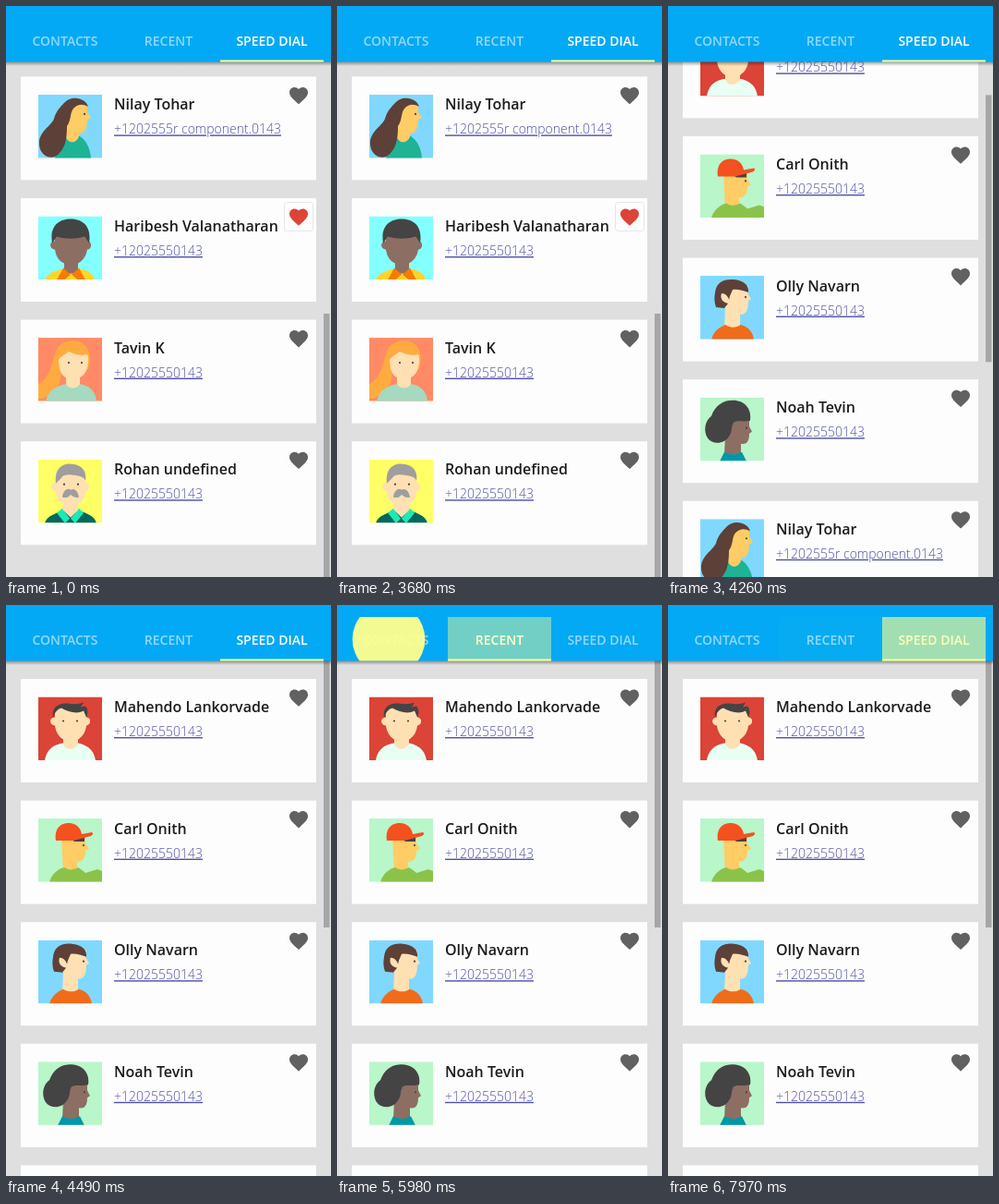
Recreate the animation shown at these times as an HTML page. Size 352x618 px, loop 8 s.

```html
<!DOCTYPE html>
<html lang="en">
<head>
<meta charset="utf-8">
<title>Speed dial</title>
<style>
  html, body { margin: 0; width: 100%; height: 100%; overflow: hidden; background: #dfdfdf; }
  svg { display: block; font-family: "Open Sans", "Noto Sans", sans-serif; }
  .name { font-size: 16px; font-weight: 600; fill: #1c1c1c; }
  .phone { font-size: 14px; font-weight: 300; fill: #5050a8; }
  .tab { font-size: 14px; font-weight: 600; fill: #fff; text-anchor: middle; }
</style>
</head>
<body>
<svg width="352" height="618" viewBox="0 0 352 618">
  <defs>
    <clipPath id="face"><rect width="69" height="68.5"/></clipPath>
    <linearGradient id="shade" x2="0" y2="1">
      <stop stop-color="#000" stop-opacity=".4"/>
      <stop offset="1" stop-color="#000" stop-opacity="0"/>
    </linearGradient>
  </defs>
  <rect width="352" height="618" fill="#dfdfdf"/>
  <g id="list"></g>
  <rect id="thumb" x="344" width="6.5" height="289" fill="#a6a6a8"/>
  <rect y="60" width="352" height="5" fill="url(#shade)"/>
  <rect width="352" height="60.5" fill="#03a9f4"/>
  <g id="tabs"></g>
  <rect id="bar" y="58.5" height="2" fill="#ffff8d"/>
  <g id="ripples" fill="#ffff8d"></g>
</svg>
<script>
const $ = id => document.getElementById(id);
const path = (fill, d) => `<path fill="${fill}" d="${d}"/>`;
const dots = (...xy) => xy.map(([x, y]) => `<circle cx="${x}" cy="${y}" r="1.1" fill="#444"/>`).join('');
const HEART = 'M12 21.35l-1.45-1.32C5.4 15.36 2 12.28 2 8.5 2 5.42 4.42 3 7.5 3c1.74 0 3.41.81 4.5 2.09C13.09 3.81 14.76 3 16.5 3 19.58 3 22 5.42 22 8.5c0 3.78-3.4 6.86-8.55 11.54z';
const PHONE = '+12025550143';
const DARK = '#444', BROWN = '#5d4037', PALE = '#ffe0b2', TAN = '#ffcc66', UMBER = '#8d6e63';
const SKY = '#80d8ff', MINT = '#b9f6ca';

// name, backdrop, portrait shapes, phone
const people = [
  ['Mahendo Lankorvade', '#db4437',
    path('#e8fff4', 'M7 69C9 55 19 51 27 50H43C52 52 60 56 62 69Z') +
    path(PALE, 'M18 16C22 7 47 7 52 16V22C58 22 57 31 52 31C51 40 46 44 43 46V51C39 58 30 58 27 51V46C22 43 19 38 18 31C12 31 11 22 18 22Z') +
    path(DARK, 'M16 22C14 11 22 6 32 7C38 8 44 8 49 6L46 11L51 10C54 13 54 18 52 22L49 15C42 19 32 16 25 12C19 14 18 18 16 22Z') +
    dots([27, 26], [42, 26])],
  ['Carl Onith', MINT,
    path(TAN, 'M25 20H51V27L55 33L51 35C51 44 47 47 42 47V56L27 58Z') +
    path('#8bc34a', 'M12 69C15 58 24 54 28 53C34 57 40 55 43 53C46 55 49 57 51 59L64 55L69 57V69Z') +
    path(DARK, 'M36 23L50 20V25L39 25Z') +
    path('#f4511e', 'M19 24C17 10 25 5 33 5C41 5 46 10 47 17L58 15C60 16 59 18 57 19L38 24Z') +
    dots([49, 29])],
  ['Olly Navarn', SKY,
    path(PALE, 'M28 11H52V20L55 25L52 27C52 38 49 42 43 42V56L26 58Z') +
    path('#ef6c1a', 'M12 69C15 58 23 55 27 53C33 57 39 56 44 53C52 55 57 61 58 69Z') +
    path(BROWN, 'M17 34C15 29 15 23 16 18C17 7 26 3 36 4C47 5 53 10 52 18C46 16 40 14 35 15L32 22L30 30L26 35Z') +
    path(PALE, 'M32 30C24 30 21 24 23 19C28 19 31 23 32 30Z') +
    dots([49, 23])],
  ['Noah Tevin', MINT,
    path(UMBER, 'M28 20H53V31L56 37L53 39C53 49 49 51 44 50V62H26Z') +
    path('#0097a7', 'M21 69L26 59C33 63 40 62 45 59L50 69Z') +
    path(DARK, 'M35 3C48 3 56 12 54 25C46 27 41 24 36 27C33 32 35 37 31 42C26 51 13 51 8 44C3 36 5 25 12 20C16 9 24 3 35 3Z') +
    dots([50, 33])],
  ['Nilay Tohar', SKY,
    path('#1db394', 'M18 69C20 52 28 43 36 42C48 43 56 54 57 69Z') +
    path(TAN, 'M31 11H53V19L57 25L53 27C53 38 49 42 44 42C46 49 34 58 29 44Z') +
    path(BROWN, 'M27 10C35 0 51 3 54 13C48 10 43 10 38 15C34 20 36 27 31 34C31 45 30 56 23 63C17 72 2 68 1 54C0 40 14 34 17 26C19 19 22 15 27 10Z') +
    dots([50, 21])],
  ['Haribesh Valanatharan', '#84ffff',
    path('#ffd42a', 'M7 69C9 62 19 59 26 57H46C53 59 60 62 61 69Z') +
    path(UMBER, 'M18 18H53V27C59 27 58 36 53 36C52 44 47 49 43 51V62H28V51C23 49 19 44 18 36C12 36 11 27 18 27Z') +
    path('#f57c00', 'M27 56L35 63L28 69H20ZM44 56L36 63L43 69H51Z') +
    path(DARK, 'M15 29C12 11 22 3 35 3C48 3 58 11 55 29C52 26 52 23 50 22C40 25 30 25 20 22C18 24 18 26 15 29Z')],
  ['Tavin K', '#ff8a65',
    path('#ffab40', 'M18 18C20 0 52 -3 55 17C57 22 55 30 54 34L24 36C26 48 20 60 4 66L0 66V50C12 44 14 30 18 18Z') +
    path('#a5d9c0', 'M8 69C11 55 22 52 30 50H45C55 52 62 57 63 69Z') +
    path(PALE, 'M22 22C26 13 49 10 54 20C55 34 50 41 45 43V50C42 56 33 56 30 50V43C25 41 22 35 22 22Z') +
    path('#ffab40', 'M20 26C21 4 44 2 54 17C51 20 40 19 33 15C29 18 24 20 20 26Z') +
    dots([33, 27], [47, 27])],
  ['Rohan undefined', '#ffff66',
    path('#00695c', 'M7 69C9 61 20 58 27 55H43C52 58 61 61 63 69Z') +
    path('#1de9b6', 'M26 53L34 64L29 69L20 58ZM44 53L35 64L40 69L49 58Z') +
    path(PALE, 'M19 14C24 5 46 5 51 14V25C57 25 56 34 51 34C51 43 47 46 43 48V55L35 63L27 55V48C22 46 19 42 19 34C13 34 12 25 19 25Z') +
    path('#9e9e9e', 'M19 26C17 12 25 4 35 5C46 5 53 12 51 23C49 18 43 18 39 17C32 16 27 16 25 20Z') +
    path('#9e9e9e', 'M26 41C27 32 33 31 35 33C38 31 43 33 44 41C40 42 37 40 35 38C33 41 30 42 26 41Z') +
    dots([28, 27], [43, 27])]
];
people[4].push('+1202555r component.0143');

function card([name, back, art, phone = PHONE], i) {
  const loved = i === 5;
  return `<g transform="translate(0 ${80 + i * 131.6})">
    <rect x="16" width="320" height="112" fill="#fdfdfd"/>
    <g transform="translate(35 19.5)" clip-path="url(#face)"><rect width="69" height="69" fill="${back}"/>${art}</g>
    <text class="name" x="117" y="36">${name}</text>
    <text class="phone" x="117" y="62" text-decoration="underline">${phone}</text>
    ${loved ? '<rect x="301.5" y="4.5" width="31" height="31" rx="3" fill="#fdfdfd" stroke="#e6e6e6"/>' : ''}
    <path transform="translate(305 8.5)" fill="${loved ? '#db4437' : '#616161'}" d="${HEART}"/>
  </g>`;
}

const tabX = i => 8 + i * 112;
const clamp = x => Math.min(1, Math.max(0, x));

$('list').innerHTML = people.map(card).join('');
$('tabs').innerHTML = ['CONTACTS', 'RECENT', 'SPEED DIAL'].map((label, i) =>
  `<text class="tab" x="${tabX(i) + 56}" y="43">${label}</text>`).join('');

// release time of each tap, tab before, tab after
const taps = [[5320, 2, 1], [5985, 1, 0], [7010, 0, 1], [7595, 1, 2]];
const PRESS = 80;
$('ripples').innerHTML = taps.map(([, , to]) =>
  `<svg x="${tabX(to)}" y="13" width="112" height="47.5">
    <rect width="112" height="48"/><circle cx="48" cy="24"/>
  </svg>`).join('');
const labels = [...$('tabs').children];
const ripples = [...$('ripples').children];

function scrollAt(t) {
  if (t < 3839) return 530;
  if (t < 4260) return 530 * Math.exp(-0.00477 * (t - 3839));
  return 71 * (1 - clamp((t - 4260) / 225)) ** 1.15;
}

function drawTabs(t) {
  const past = taps.filter(tap => t >= tap[0]);
  const [at, from, to] = past.length ? past[past.length - 1] : [-1000, 2, 2];
  // the bar first stretches over both tabs, then shrinks to the new one
  const grow = clamp((t - at) / 150) ** 1.7;
  const shrink = 1 - (1 - clamp((t - at - 150) / 180)) ** 3;
  const lead = tabX(from) + (tabX(to) - tabX(from)) * grow;
  const trail = tabX(from) + (tabX(to) - tabX(from)) * shrink;
  $('bar').setAttribute('x', Math.min(lead, trail));
  $('bar').setAttribute('width', Math.abs(lead - trail) + 112);

  const mix = clamp((t - at) / 100);
  labels.forEach((el, i) => {
    const on = (i === to ? mix : 0) + (i === from ? 1 - mix : 0);
    el.setAttribute('fill-opacity', 0.56 + 0.44 * on);
  });

  // a wave spreads from the press and fades after release, over a faint wash
  ripples.forEach((el, i) => {
    const [wash, wave] = el.children;
    const down = Math.max(0, t - taps[i][0] + PRESS) / 1000;
    const up = Math.max(0, t - taps[i][0]) / 1000;
    const fade = Math.max(0, 0.95 - 0.98 * up);
    wave.setAttribute('r', 139 * (1 - 80 ** -down));
    wave.setAttribute('opacity', fade);
    wash.setAttribute('opacity', Math.min(0.3 * up, fade));
  });
}

function draw(now) {
  const t = now % 8000;
  const s = scrollAt(t);
  $('list').setAttribute('transform', `translate(0 ${-s})`);
  $('thumb').setAttribute('y', 60 + 0.515 * s);
  drawTabs(t);
}

const start = performance.now();
function tick() {
  draw(performance.now() - start);
  requestAnimationFrame(tick);
}
tick();
</script>
</body>
</html>
```
